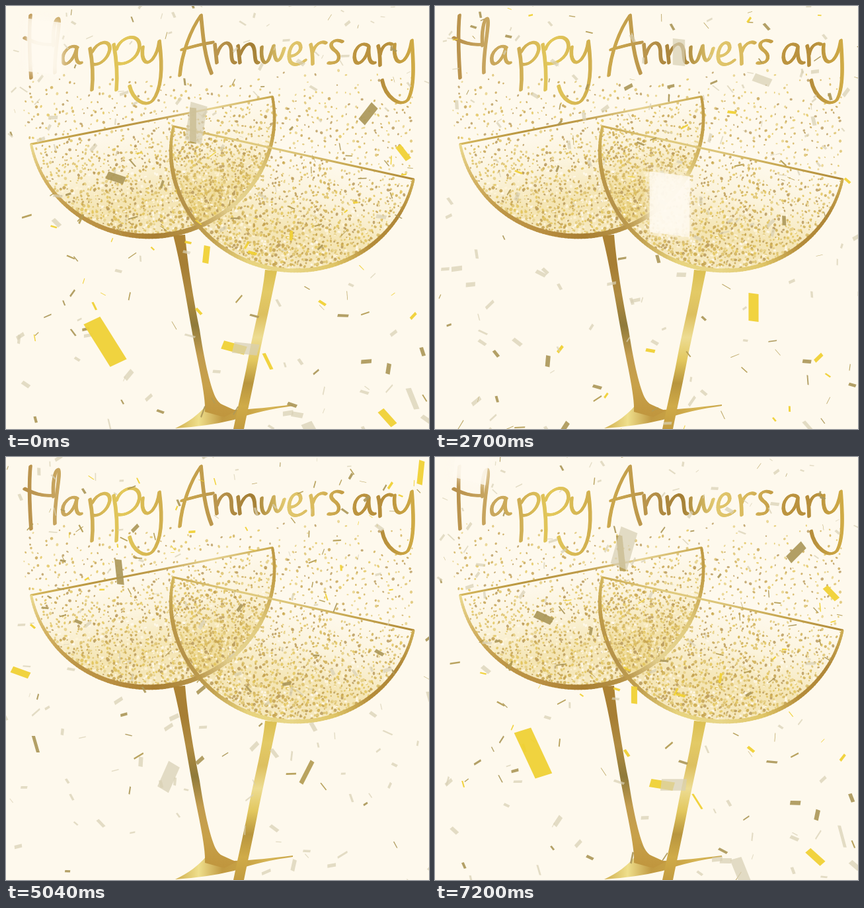
Write an HTML page with a canvas that moves like this. It is 640 by 640 pixels and loops after 7320 ms.

```html
<!DOCTYPE html>
<html lang="en">
<head>
<meta charset="utf-8">
<title>Happy Anniversary</title>
<style>
html, body { margin: 0; width: 100%; height: 100%; overflow: hidden; background: #fef9ed; }
canvas { display: block; width: 640px; height: 640px; }
</style>
</head>
<body>
<canvas id="stage" width="640" height="640" role="img" aria-label="Happy Anniversary"></canvas>
<script>
const SIZE = 640, STEP = 60, LOOP = 7320, FRAMES = 121;
const stage = document.getElementById('stage').getContext('2d');

function seeded(seed) {
  return () => {
    seed = (seed + 0x6d2b79f5) | 0;
    let t = Math.imul(seed ^ (seed >>> 15), 1 | seed);
    t = (t + Math.imul(t ^ (t >>> 7), 61 | t)) ^ t;
    return ((t ^ (t >>> 14)) >>> 0) / 4294967296;
  };
}
const rand = seeded(41);
const pick = list => list[Math.floor(rand() * list.length)];
const spread = (a, b) => a + rand() * (b - a);

function gradient(c, x0, y0, x1, y1, colors) {
  const g = c.createLinearGradient(x0, y0, x1, y1);
  colors.forEach((col, i) => g.addColorStop(i / (colors.length - 1), col));
  return g;
}

// Bowls are half ellipses hanging below a tilted rim.
const bowls = [
  { x: 220.5, y: 173, tilt: -0.195, rx: 186, ry: 175,
    rim: ['#d5b75c', '#b99640', '#bd9a48', '#e6d291', '#c9a94f'],
    edge: ['#ead88f', '#d2b060', '#bd9647', '#b98f42', '#a87e32', '#b8954a', '#e6d494', '#e0ca7c', '#c5a24c', '#bf9a45'],
    width: [4, 5, 6, 7, 8, 7, 6, 6, 5, 4] },
  { x: 435, y: 222, tilt: 0.2165, rx: 186, ry: 178,
    rim: ['#cbab54', '#e0ca7e', '#dcc478', '#c6a650', '#b08a38'],
    edge: ['#d3b65c', '#bd9a4a', '#b5924a', '#c2a150', '#e8d47e', '#e8d688', '#e0c668', '#b48c3a', '#b08738', '#d0b056'],
    width: [4, 6, 6, 6, 6, 6, 6, 6, 5, 4] }
];

const gold = ['#cfae52', '#dcc06a', '#c4a04c', '#e6cf82', '#b8985a', '#e2c45a'];

function dot(c, x, y, r) {
  c.fillStyle = pick(gold);
  c.beginPath();
  c.ellipse(x, y, r, r * spread(0.6, 1), rand() * 3, 0, 7);
  c.fill();
}

function bubbles(c) {
  c.globalAlpha = 0.8;
  for (let x = 32; x < 620; x += 10.5) {
    for (let y = 102; y < 265; y += 10.5) {
      const px = x + spread(-5, 5), py = y + spread(-5, 5);
      const rim = px < 403 ? 214 - 0.197 * px : 178 + (px - 253) * 0.22;
      if (py < rim && rand() < (py - 88) / 75) dot(c, px, py, spread(1.2, 2.4));
    }
  }
  c.globalAlpha = 1;
}

function inBowl(c, b, draw) {
  c.save();
  c.translate(b.x, b.y);
  c.rotate(b.tilt);
  draw();
  c.restore();
}

function glitter(c, b) {
  inBowl(c, b, () => {
    c.beginPath();
    c.ellipse(0, 0, b.rx, b.ry, 0, 0, Math.PI);
    c.clip();
    c.fillStyle = gradient(c, 0, 0, 0, b.ry,
      ['rgba(236,212,130,0)', 'rgba(236,212,130,.16)', 'rgba(234,208,120,.5)', 'rgba(234,210,130,.42)']);
    c.fillRect(-b.rx, 0, 2 * b.rx, b.ry);
    c.globalAlpha = 0.82;
    for (let v = 4; v < b.ry; v += 5.6 - v / 120) {
      for (let u = -b.rx; u < b.rx; u += 5.6) {
        const depth = v / b.ry, x = u + spread(-3, 3), y = v + spread(-3, 3);
        if (rand() > 0.34 + depth * 0.85) continue;
        if (depth > 0.3 && rand() < 0.2) {
          c.fillStyle = pick(['#fffbee', '#fff6da']);
          c.fillRect(x - 2, y - 2, spread(2, 5), spread(2, 4));
        } else dot(c, x, y, spread(1.2, 2.4 + depth * 0.5));
      }
    }
  });
}

function outline(c, b) {
  inBowl(c, b, () => {
    c.lineWidth = 3;
    c.lineCap = 'round';
    c.strokeStyle = gradient(c, -b.rx, 0, b.rx, 0, b.rim);
    c.beginPath();
    c.moveTo(-b.rx, 0);
    c.lineTo(b.rx, 0.01);
    c.stroke();
    c.lineCap = 'butt';
    const parts = 120, last = b.edge.length - 1;
    const at = i => [-b.rx * Math.cos(i / parts * Math.PI), b.ry * Math.sin(i / parts * Math.PI)];
    for (let i = 0; i < parts; i++) {
      const k = i / parts * last, n = Math.floor(k), f = k - n;
      const p = at(i), q = at(i + 1.3), e = at(i + 1);
      c.lineWidth = b.width[n] * (1 - f) + b.width[n + 1] * f;
      c.strokeStyle = `color-mix(in srgb, ${b.edge[n]} ${(1 - f) * 100}%, ${b.edge[n + 1]})`;
      c.beginPath();
      c.moveTo(...p);
      c.lineTo(...(i < parts - 1 ? q : e));
      c.stroke();
    }
  });
}

function shape(c, path, fill) {
  c.fillStyle = fill;
  c.fill(new Path2D(path));
}

function stems(c) {
  shape(c, 'M303 604C292 618 275 630 256 639Q304 636 345 626C372 616 404 609 434 605L434 603C400 607 375 610 345 611L325 602Z',
    gradient(c, 256, 0, 434, 0, ['#cfae4c', '#efdf8c', '#c19a42', '#c9a344', '#d6b555', '#c9a64a']));
  shape(c, 'M253 347L271 346C275 395 284 445 293 490C299 530 308 573 317 592Q325 608 350 612L330 622L301 614C303 590 288 530 281 490C272 440 264 390 253 347Z',
    gradient(c, 0, 346, 0, 620, ['#ad8334', '#a67e34', '#b08b40', '#8f7a3a', '#c29c4e', '#c8a14a', '#c0963e']));
  shape(c, 'M392 399L410 401C402 440 391 490 382 533C375 570 366 610 360 640L344 640C352 600 362 560 369 520C377 480 388 440 392 399Z',
    gradient(c, 0, 398, 0, 640, ['#dcc052', '#e3ca66', '#ddc060', '#eddc92', '#e2c75e', '#b8953e', '#d0ab48', '#c39c40']));
}

const lettering = [
  // Happy
  'M37 14C34 45 36 80 38 109', 'M28 48C40 54 54 60 72 58', 'M72 60C70 40 74 18 79 19C84 24 72 70 74 101',
  'M108 63C98 56 84 70 86 83C88 94 102 84 107 64C105 76 106 88 114 86',
  'M127 64C131 85 132 108 130 127M130 70C140 52 158 50 157 66C154 80 142 90 132 88',
  'M163 58C167 80 169 105 167 127M167 66C174 44 203 40 202 62C199 80 182 89 169 87',
  'M207 62C204 82 212 92 222 80C228 72 231 62 232 53C237 90 236 125 222 143C210 154 192 142 187 121',
  // Anniversary
  'M295 14C280 35 266 70 263 105M295 14C298 45 300 75 311 102', 'M266 66C280 62 298 57 313 55',
  'M316 58L319 86M319 74C326 52 340 50 341 68C341 80 342 86 347 86',
  'M351 60L354 86M354 74C362 54 374 52 376 68C377 80 377 86 382 86',
  'M387 62C385 84 392 92 398 80L405 60C406 86 413 92 421 64',
  'M428 76C440 76 450 66 444 57C434 50 424 72 430 84C436 92 446 88 453 82',
  'M461 58C464 68 464 78 464 88M464 70C468 58 476 52 484 56',
  'M509 54C496 48 486 58 496 66C508 74 506 88 488 86',
  'M548 60C536 52 524 68 528 82C532 94 546 80 549 62C548 76 550 88 558 86',
  'M563 60C566 70 566 80 566 90M566 74C568 62 576 54 584 58',
  'M588 58C586 78 592 90 602 82C608 76 612 64 614 52C617 90 618 125 608 142C596 154 574 138 569 112'
];

function writing(c) {
  c.save();
  c.lineCap = c.lineJoin = 'round';
  c.lineWidth = 3.6;
  c.strokeStyle = gradient(c, 28, 0, 618, 0, ['#b8904a', '#c8a660', '#cfae55', '#e4c95a', '#d3b250',
    '#c9a54c', '#b8934c', '#a37e34', '#e2c970', '#d9b95c', '#be9640', '#b68e3c', '#d1ac46']);
  // Offset copies give the strokes a slanted nib.
  for (const o of [-1, -0.3, 0.4, 1]) {
    c.setTransform(1, 0, 0, 1, o, -o * 0.6);
    lettering.forEach(p => c.stroke(new Path2D(p)));
  }
  c.restore();
}

const card = document.createElement('canvas');
card.width = card.height = SIZE;
const art = card.getContext('2d');
art.fillStyle = '#fef9ed';
art.fillRect(0, 0, SIZE, SIZE);
bubbles(art);
bowls.forEach(b => glitter(art, b));
bowls.forEach(b => outline(art, b));
stems(art);
writing(art);

// fill, width-to-length ratio, opacity
const kinds = {
  y: ['#f0d136', 0.36, 0.95],
  o: ['#ac985a', 0.42, 0.92],
  s: ['#b39b52', 0.18, 0.92],
  p: ['#d8d0b4', 0.46, 0.72],
  w: ['#fffaf1', 0.66, 0.8]
};

// Near pieces by step: x, y, length, angle from vertical, kind
const near = {
  0: [[150, 508, 76, -32, 'y'], [345, 517, 36, -75, 'y'], [303, 376, 26, 6, 'y'], [601, 222, 26, -38, 'y'],
    [577, 623, 30, -42, 'y'], [548, 163, 32, 38, 'o'], [166, 260, 28, -72, 'o'], [283, 181, 54, 0, 's'], [58, 62, 80, 0, 'w']],
  26: [[273, 548, 54, 8, 'p'], [325, 475, 40, 48, 'p'], [116, 363, 26, 90, 'o'], [485, 378, 58, 80, 'w']],
  45: [[482, 456, 42, 0, 'y'], [369, 70, 40, 0, 'p'], [355, 300, 92, 0, 'w'], [495, 112, 27, -70, 'p']],
  67: [[47, 165, 26, 62, 'o'], [490, 403, 44, -78, 's'], [125, 265, 38, 0, 'p']],
  84: [[246, 484, 42, 24, 'p'], [22, 326, 28, -70, 'y'], [455, 477, 38, 27, 's']],
  100: [[326, 104, 84, 0, 'o'], [171, 534, 38, 90, 'o'], [622, 174, 34, -55, 'p'], [627, 363, 36, -78, 'y'],
    [403, 195, 27, 28, 'y'], [178, 240, 64, 0, 'w']],
  120: [[286, 138, 58, 16, 'p'], [361, 496, 38, 90, 'p'], [462, 625, 38, -22, 'p']]
};

const far = Array.from({ length: 230 }, () => {
  const start = rand(), middle = (0.6 - start + 1) % 1;
  const bright = middle < 0.15 || middle > 0.75;
  return {
    start, x: spread(-10, 650), len: spread(6, 15), angle: rand() * 360,
    kind: pick(bright ? 'yyosspp' : 'oospppppp'),
    laps: rand() < 0.85 ? 1 : 2, turns: pick([-3, -2, -1, 1, 2, 3]), sway: spread(4, 18)
  };
});

function piece(x, y, len, angle, kind, flip) {
  const [fill, ratio, alpha] = kinds[kind];
  const w = len * ratio * Math.max(0.3, Math.abs(flip));
  stage.save();
  stage.translate(x, y);
  stage.rotate(angle * Math.PI / 180);
  stage.transform(1, 0.3 * (1 - Math.abs(flip)) + 0.12, 0, 1, 0, 0);
  stage.globalAlpha = alpha;
  stage.fillStyle = fill;
  if (kind === 'w') {
    stage.shadowColor = fill;
    stage.shadowBlur = 16;
  }
  stage.fillRect(-w / 2, -len / 2, w, len);
  stage.restore();
}

function draw(frame) {
  stage.drawImage(card, 0, 0);
  const phase = frame / FRAMES;
  for (const p of far) {
    const u = (p.start + p.laps * phase) % 1, wave = 2 * Math.PI * p.turns * phase;
    piece(p.x + p.sway * Math.sin(wave + p.angle), -20 + 690 * u ** 1.35, p.len * (0.8 + 0.4 * u),
      p.angle + 360 * p.turns * phase, p.kind, Math.cos(wave * 2 + p.x));
  }
  for (const [time, list] of Object.entries(near)) {
    const d = ((frame - time + FRAMES * 1.5) % FRAMES) - FRAMES / 2;
    for (const [x, y, len, angle, kind] of list) {
      const speed = 10 + 50 * (len / 76) ** 2, py = y + speed * d;
      if (py < -len || py > SIZE + len) continue;
      piece(x + 8 * Math.sin(d * 0.2), py, len, angle + d * (x % 2 ? 6 : -7), kind, Math.cos(d * 0.25));
    }
  }
}

function tick() {
  const t = performance.now() % LOOP;
  draw(Math.min(FRAMES - 1, Math.floor(t / STEP)));
  requestAnimationFrame(tick);
}
tick();
</script>
</body>
</html>
```
